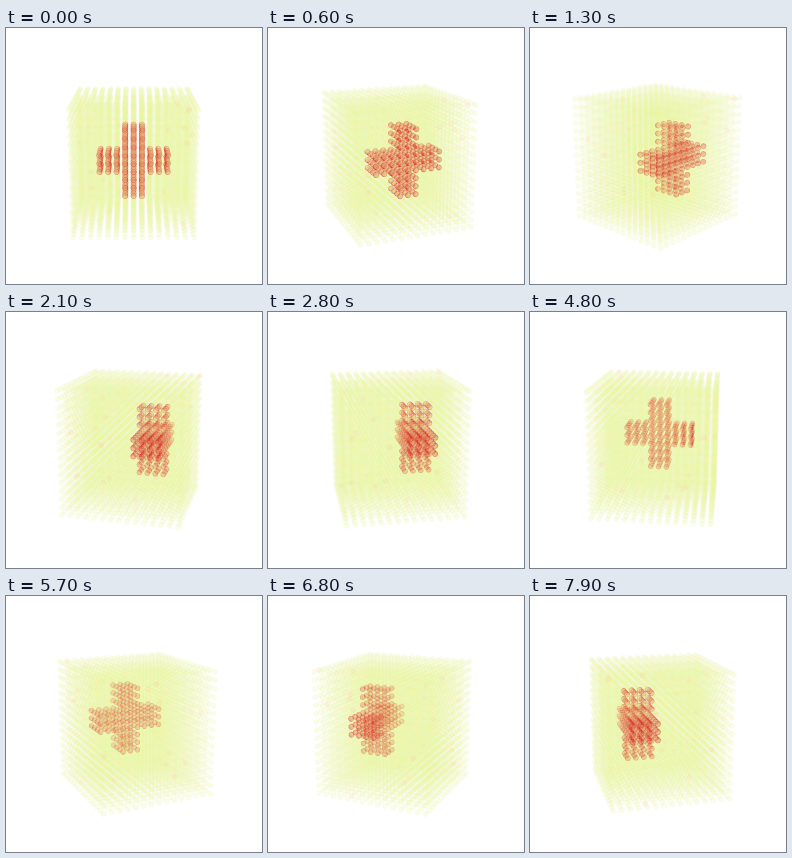
A matplotlib script for the animation above (8 s loop, 256x256 px).

```python
import numpy as np
import matplotlib.pyplot as plt
from matplotlib.animation import FuncAnimation

SIZE, DPI = 256, 100
FRAMES, STEP = 80, 3.6          # degrees turned per frame
CX, CY = 127.6, 130.3           # projected centre of the block
SIN, COS = 0.28, 0.96           # camera tilt
INV_SCALE, PERSP = 0.01766, 0.0017
DOT = 5.0 * 72 / DPI            # dot diameter in points

rng = np.random.default_rng(4)

# Lattice: 15 x 15 columns, 16 levels, in cells from the centre
axis = np.arange(15) - 7.0
X, R, Z = (a.ravel() for a in np.meshgrid(axis, axis, np.arange(16) - 7.5))

dx, dz = np.abs(X), np.abs(Z - 0.5)
plus = ((dx <= 1) & (dz <= 4)) | ((dx <= 4) & (dz <= 1))
red = plus & (R >= 1) & (R <= 4)

noise = rng.normal(size=X.size)
face = np.empty((X.size, 4))
face[:, 0] = 0.925 + 0.015 * noise
face[:, 1] = 0.970 - 0.006 * noise
face[:, 2] = 0.62 + 0.03 * rng.normal(size=X.size)
face[:, 3] = 0.24
warm = noise > 2.4
face[warm, :3] = (0.99, 0.80, 0.55)
face[red] = (0.90, 0.27, 0.20, 0.42)
face = face.clip(0, 1)

edge = face.copy()
edge[:, 3] = 0.06
edge[red] = (0.80, 0.12, 0.12, 0.55)


def project(deg):
    t = np.radians(deg)
    x = (X * np.cos(t) + R * np.sin(t)) / 7
    r = (R * np.cos(t) - X * np.sin(t)) / 7
    z = Z / 7
    depth = r * COS + z * SIN
    scale = 1 / (INV_SCALE - PERSP * depth)
    pos = np.column_stack([CX + x * scale, CY - (z * COS - r * SIN) * scale])
    return pos, depth, scale * INV_SCALE


fig = plt.figure(figsize=(SIZE / DPI, SIZE / DPI), dpi=DPI, facecolor="white")
ax = fig.add_axes([0, 0, 1, 1])
ax.set(xlim=(0, SIZE), ylim=(SIZE, 0))
ax.axis("off")
dots = ax.scatter(X, Z, s=DOT ** 2, linewidths=0.5)


def update(i):
    pos, depth, zoom = project(i * STEP)
    order = np.argsort(depth, kind="stable")
    dots.set_offsets(pos[order])
    dots.set_sizes((DOT * zoom[order]) ** 2)
    dots.set_facecolors(face[order])
    dots.set_edgecolors(edge[order])
    return (dots,)


anim = FuncAnimation(fig, update, frames=FRAMES, interval=100,
                     repeat=True, repeat_delay=0, blit=False)
plt.show()
```
